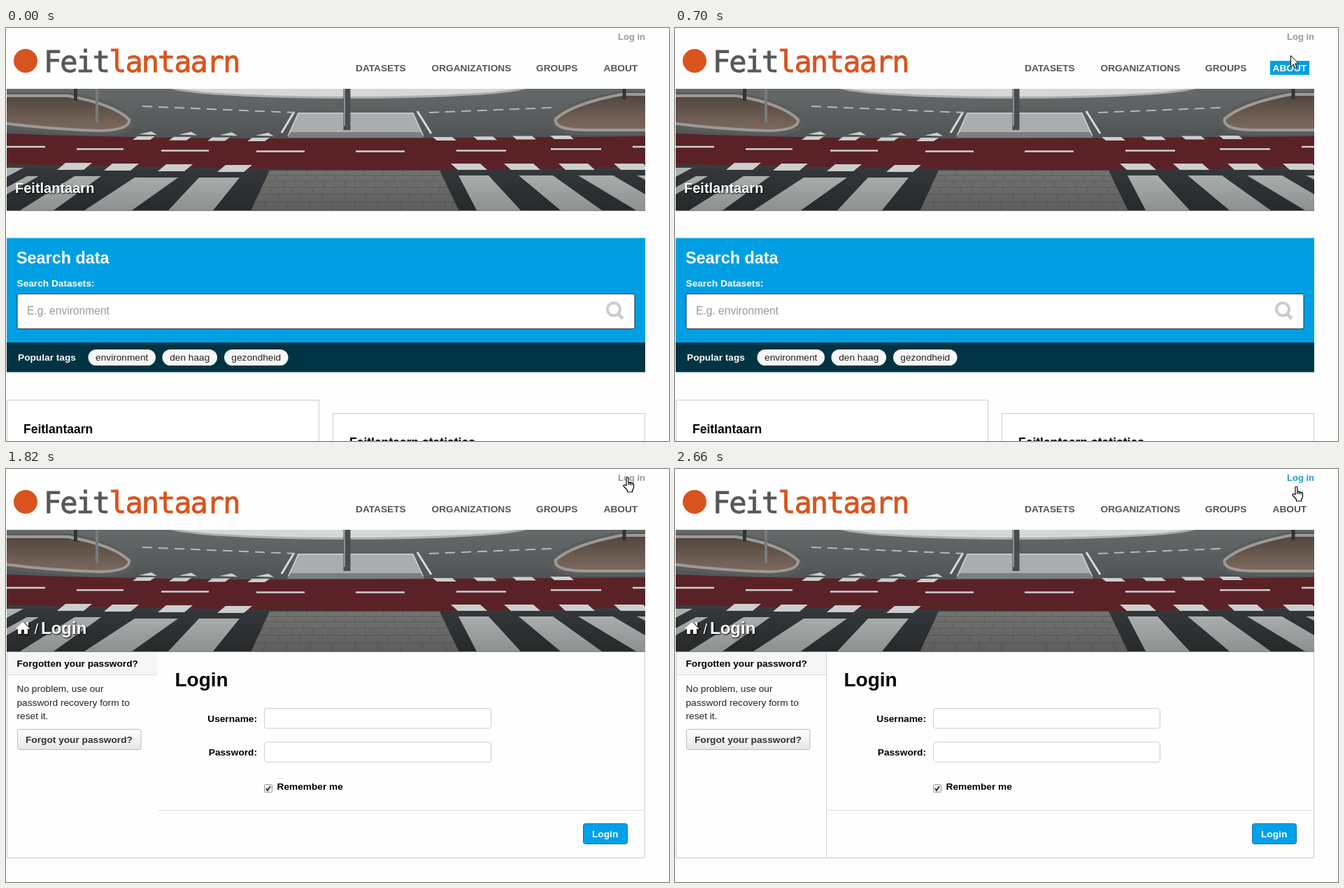
Write an HTML page that moves like this. It is 948 px wide and 591 px high and loops after 2720 ms.

```html
<!DOCTYPE html>
<html lang="en">
<head>
<meta charset="utf-8">
<title>Login demo</title>
<style>
  html, body { margin: 0; width: 100%; height: 100%; overflow: hidden; background: #fefefe; }
  svg { display: block; width: 948px; height: 591px; }
  text { font: 13.7px "Liberation Sans", Arial, sans-serif; white-space: pre; }
  .b { font-weight: bold; }
  .nav { fill: #555; }
  .brand { font: 42px "DejaVu Sans Mono", monospace; letter-spacing: -2px; stroke-width: .8px; }
  .ink { fill: #55585a; stroke: #55585a; }
  .accent { fill: #d9531e; stroke: #d9531e; }
  .over { fill: #fff; text-shadow: 1px 1px 2px #000; }
  .w { fill: #fff; }
  .box { fill: #fff; stroke: #ccc; }
</style>
</head>
<body>
<svg viewBox="0 0 948 591">
  <defs>
    <clipPath id="bannerClip"><path d="M1 87H914V261.500H1z"/></clipPath>
    <linearGradient id="road" x2="0" y2="1">
      <stop stop-color="#666a6b"/><stop offset=".4" stop-color="#505355"/>
      <stop offset=".68" stop-color="#34373a"/><stop offset="1" stop-color="#303335"/>
    </linearGradient>
    <linearGradient id="shade" x2="0" y2="1">
      <stop offset=".65" stop-opacity="0"/><stop offset="1" stop-opacity=".2"/>
    </linearGradient>
    <linearGradient id="soil" x2="0" y2="1">
      <stop stop-color="#51463f"/><stop offset="1" stop-color="#7d6a5e"/>
    </linearGradient>
    <linearGradient id="grey" x2="0" y2="1">
      <stop stop-color="#fff"/><stop offset="1" stop-color="#e6e6e6"/>
    </linearGradient>
  </defs>

  <circle cx="28" cy="47" r="17" fill="#d9531e"/>
  <text class="brand ink" x="54" y="63">Feit<tspan class="accent">lantaarn</tspan></text>
  <text id="logIn" class="b" x="875" y="17" style="font-size:13px">Log in</text>
  <text class="b nav" x="500" y="62">DATASETS</text>
  <text class="b nav" x="608.500" y="62">ORGANIZATIONS</text>
  <text class="b nav" x="758" y="62">GROUPS</text>
  <path id="aboutBg" d="M851 47h56v20h-56z" fill="#009fe3"/>
  <text id="about" class="b" x="854.500" y="62">ABOUT</text>

  <g clip-path="url(#bannerClip)">
    <path d="M1 87H914V262H1z" fill="url(#road)"/>
    <ellipse cx="490" cy="84" rx="258" ry="17" fill="#aaaeac"/>
    <ellipse cx="490" cy="82" rx="254" ry="16" fill="#d6d8d5"/>
    <g stroke="#5b5c5c" stroke-width="10" fill="none">
      <path id="leftRim" d="M-5 97H88Q156 109 179 131Q183 149 134 149Q60 147-5 138"/>
      <path id="rightRim" d="M920 95H880Q808 108 783 130Q778 148 830 148H920"/>
    </g>
    <g stroke="#9d9a95" stroke-width="4" fill="url(#soil)">
      <use href="#leftRimTop"/>
      <path d="M-5 97H88Q154 109 176 131Q178 146 134 147Q60 145-5 136z"/>
      <path d="M920 95H880Q811 108 786 130Q782 146 830 146H920z"/>
    </g>
    <path d="M99.500 87V104M884 87V102" stroke="#303436" stroke-width="5"/>
    <path d="M130 87V135" stroke="#777b7c" stroke-width="4"/>
    <path d="M-1 151Q200 159 460 158T915 155V197Q760 204 560 203T-1 195z" fill="#5a2227"/>
    <path d="M418 122H582L596 153H404z" fill="#a9adae" stroke="#c3c6c6" stroke-width="2"/>
    <path d="M407 149H593L598 157H402z" fill="#7b7f81"/>
    <path d="M487.500 87V146" stroke="#484c4f" stroke-width="10"/>
    <path d="M484 87V140" stroke="#8d9192" stroke-width="2"/>
    <path d="M412 120L394 150M588 119L608 151" stroke="#d8dada" stroke-width="3"/>
    <path d="M195 112L412 121M605 121L780 114" stroke="#b4b7b7" stroke-width="2" stroke-dasharray="14 9"/>
    <path id="marks" fill="#cdcfce"/>
    <g fill="#b0b3b3">
      <path d="M1 200H25L1 213zM30 212H47L1 238V228zM98 212H136L68 261H20zM184 214H246L180 261H112zM276 214H334L296 261H232z"/>
      <path d="M647 211H690L736 261H673zM733 211H782L852 261H793zM818 211H868L914 238V261H901zM902 211H914V217z"/>
    </g>
    <path d="M377 204H620L648 262H350z" fill="#747473"/>
    <path id="bricks" fill="none" stroke="#606160"/>
    <path d="M1 87H914V262H1z" fill="url(#shade)"/>
  </g>

  <g id="home">
    <text class="b over" x="13" y="236" style="font-size:20px">Feitlantaarn</text>
    <path d="M1 300.500H914V450H1z" fill="#009fe3"/>
    <path d="M1 450H914V492.500H1z" fill="#003444"/>
    <text class="b w" x="15" y="337" style="font-size:23.4px">Search data</text>
    <text class="b w" x="15.500" y="370">Search Datasets:</text>
    <rect x="16" y="380.500" width="883" height="50" rx="2" fill="#fff" stroke="#1b2a33"/>
    <text x="30" y="410" fill="#999" style="font-size:15.6px">E.g. environment</text>
    <g fill="none" stroke="#ccc" stroke-width="4">
      <circle cx="869" cy="402.500" r="9"/><path d="M875 409l7 7" stroke-width="5"/>
    </g>
    <text class="b w" x="17" y="476">Popular tags</text>
    <g id="tags"></g>
    <rect class="box" x="1.500" y="532.500" width="446" height="90"/>
    <rect class="box" x="467.500" y="551.500" width="446" height="90"/>
    <text class="b" x="25" y="580" style="font-size:17.5px">Feitlantaarn</text>
    <text class="b" x="491" y="598.500" style="font-size:17.5px">Feitlantaarn statistics</text>
  </g>

  <g id="login">
    <path d="M14 228L24 219L34 228L32.500 229.500L31 228V236H26V230H22V236H17V228L15.500 229.500zM29 219h3v6l-3-3z" fill="#fff" style="filter:drop-shadow(1px 1px 1px #000)"/>
    <text class="over" x="40.500" y="236" style="font-size:20px">/</text>
    <text class="b over" x="50" y="236" style="font-size:24px">Login</text>
    <path d="M1.500 262V556.500H913.500V262" fill="none" stroke="#ccc"/>
    <path d="M2 262H216V294H2z" fill="#f6f6f6"/>
    <path d="M2 294.500H216M218 488.500H913" stroke="#ddd"/>
    <path id="divider" d="M216.500 262V556" stroke="#d4d4d4"/>
    <text class="b" x="15.500" y="283">Forgotten your password?</text>
    <g fill="#222">
      <text x="15.500" y="319">No problem, use our</text>
      <text x="15.500" y="338.500">password recovery form to</text>
      <text x="15.500" y="357.500">reset it.</text>
    </g>
    <rect x="16.500" y="372.500" width="176.500" height="29" rx="3" fill="url(#grey)" stroke="#bbb"/>
    <text class="b" x="28" y="392" fill="#333">Forgot your password?</text>
    <text class="b" x="241.500" y="311" style="font-size:28px">Login</text>
    <text class="b" x="359" y="361.500" text-anchor="end">Username:</text>
    <text class="b" x="359" y="410" text-anchor="end">Password:</text>
    <rect class="box" x="369.500" y="342.500" width="324" height="28.500" rx="3"/>
    <rect class="box" x="369.500" y="391" width="324" height="28.500" rx="3"/>
    <rect x="369.500" y="451.500" width="11" height="11" rx="1" fill="#f0f0f0" stroke="#999"/>
    <path d="M372 457l2 3l4-6" fill="none" stroke="#333" stroke-width="2"/>
    <text class="b" x="387.500" y="459">Remember me</text>
    <rect x="825.500" y="507.500" width="63" height="29" rx="3" fill="#00a1eb" stroke="#1f6f94"/>
    <text class="b w" x="838" y="527">Login</text>
  </g>

  <g fill="#fff" stroke="#000" stroke-linejoin="round">
    <path id="arrow" d="M.5.5V16.500L4.200 13L6.500 18.500L9 17.500L6.700 12H11.500z"/>
    <path id="hand" stroke-width="1.200" d="M5 13V2.500a1.500 1.500 0 0 1 3 0V8.500q1.500-1 2.500.3q1.500-.8 2.500.6q1.800-.4 2.500 1V15q0 3-2 4.500V22H6.500v-2.500L1 13.500q-.5-2 1.500-2q1.500.5 2.500 1.500M8 8v4M10.500 9v3M13 9.500v3"/>
  </g>
</svg>
<script>
const $ = id => document.getElementById(id);
const LOOP = 2720;
const LINK = '#1f9bd1';

// Road markings, row by row.
const slab = (x, y, w, h, skew) => `M${x + skew} ${y}h${w - Math.abs(skew)}l${-skew} ${h}h${-w + Math.abs(skew)}z`;
const marks = [
  ...[181, 233, 288, 345].map((x, i) => slab(x, 155 + i * .7, 32, 5, 7)),
  ...[610, 668, 724, 778].map((x, i) => slab(x + 6, 156 - i * .7, 34, 5, -6)),
  ...[73, 140, 217, 302].map((x, i) => slab(x, 193 + i, 50, 10, 12)),
  ...[636, 712, 790, 869].map((x, i) => slab(x + 10, 194, 52, 9, -10)),
  ...[190, 247, 305, 357].map((x, i) => `M${x} ${152 + i * .6}l18-4l8 5z`),
  ...[-10, 101, 222, 358, 500, 644, 779, 896].map((x, i) =>
    `M${x} ${175.5 - (i - 3.5) ** 2 * .55}h${66 + i}v2.500h${-66 - i}z`)
];
$('marks').setAttribute('d', marks.join(''));

// Paving in perspective: rows grow towards the viewer, joints alternate.
let bricks = '';
for (let row = 0, y = 204; row < 6; row++) {
  const h = 7 + row, half = 122 + (y - 204) * .47;
  bricks += `M${499 - half} ${y}h${half * 2}`;
  for (let i = 0; i < 9; i++) {
    const k = (i + (row % 2) / 2) / 4.5 - 1;
    bricks += `M${499 + k * half} ${y}l${k * h * .47} ${h}`;
  }
  y += h;
}
$('bricks').setAttribute('d', bricks);

$('tags').innerHTML = [[117.5, 96.5, 'environment'], [223.5, 78.5, 'den haag'], [312, 91.5, 'gezondheid']]
  .map(([x, w, label]) => `<rect x="${x}" y="460" width="${w}" height="23" rx="11.5" fill="#f7f7f7"/>
    <text x="${x + w / 2}" y="476" text-anchor="middle" fill="#222">${label}</text>`).join('');

// Pointer steps: start time, kind, x, y, hovered link.
const steps = [
  [0, 'none', 0, 0, ''],
  [420, 'arrow', 946, 173, ''],
  [560, 'arrow', 898, 78, ''],
  [700, 'arrow', 880, 39, 'about'],
  [840, 'hand', 882, 17, 'logIn'],
  [980, 'hand', 882, 13, 'logIn'],
  [1120, 'hand', 882, 11, 'logIn'],
  [1820, 'hand', 882, 11, ''],
  [2520, 'hand', 882, 15, 'logIn'],
  [2660, 'hand', 882, 24, 'logIn']
];
const show = (id, on) => $(id).setAttribute('visibility', on ? 'visible' : 'hidden');

function render(t) {
  const [, kind, x, y, hover] = steps.findLast(s => s[0] <= t);
  for (const id of ['arrow', 'hand']) {
    show(id, id === kind);
    $(id).setAttribute('transform', `translate(${x} ${y})`);
  }
  $('logIn').style.fill = hover === 'logIn' ? LINK : '#999';
  $('about').style.fill = hover === 'about' ? '#fff' : '#555';
  show('aboutBg', hover === 'about');
  show('home', t < 1820);
  show('login', t >= 1820);
  show('divider', t >= 1960);
}

const start = performance.now();
function tick() {
  render((performance.now() - start) % LOOP);
  requestAnimationFrame(tick);
}
tick();
</script>
</body>
</html>
```
